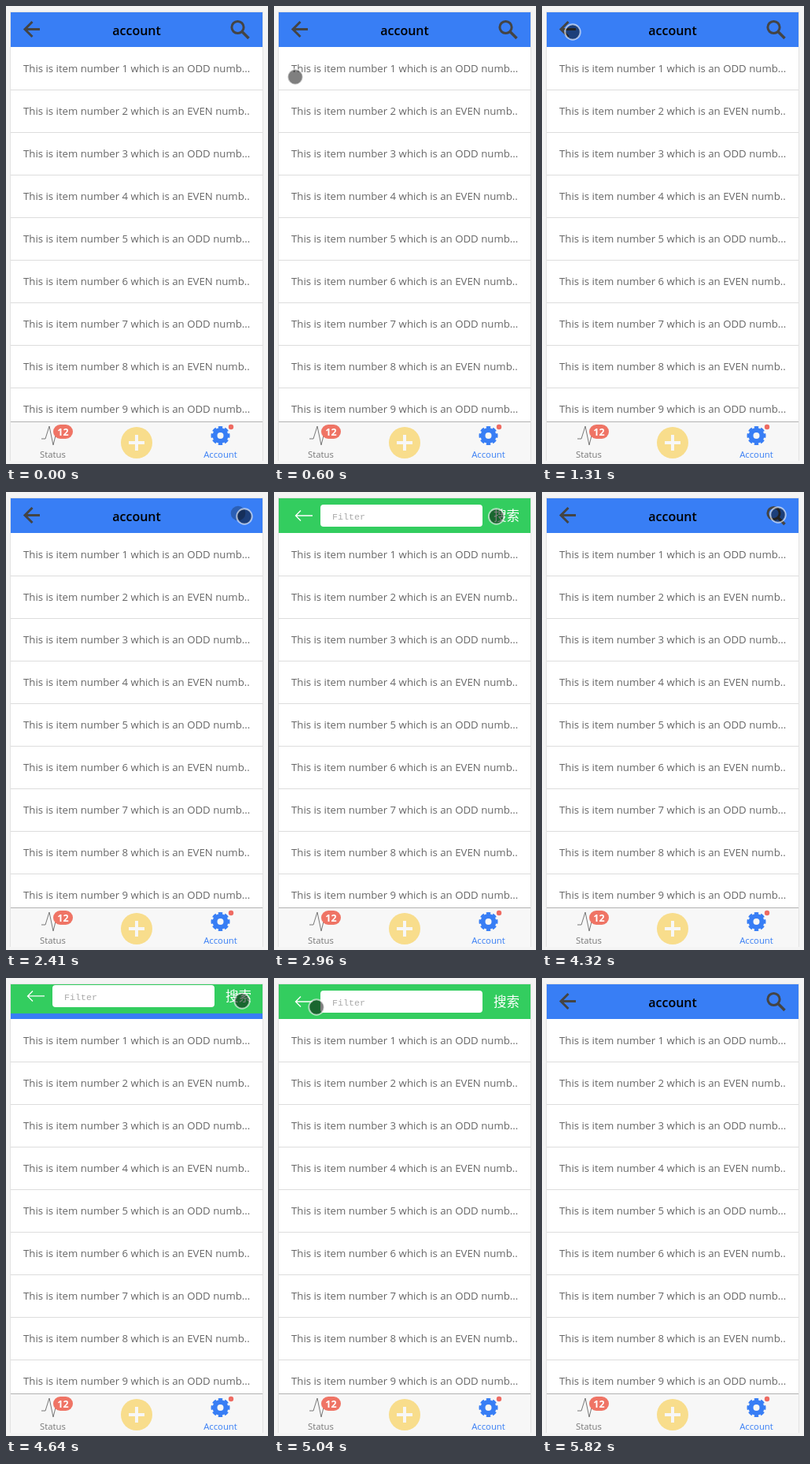
Animation of 333x581 px, one loop 6.36 s. Source, as an HTML page:

```html
<!DOCTYPE html>
<html>
<head>
<meta charset="utf-8">
<style>
html, body { margin: 0; width: 100%; height: 100%; overflow: hidden; background: #f4f4f4; }
svg { display: block; }
text { font-family: "Open Sans", "Noto Sans", sans-serif; }
.row { font-size: 13.22px; fill: #666; }
.line { fill: none; }
.tab { font-size: 11.3px; text-anchor: middle; }
</style>
</head>
<body>
<svg width="333" height="581" viewBox="0 0 333 581">
  <defs><clipPath id="screen"><rect x="6" y="8" width="320" height="569"/></clipPath></defs>
  <rect x="5.5" y="7.5" width="321" height="569" fill="#fff" stroke="#e3e3e3"/>
  <g clip-path="url(#screen)">
    <g id="list"></g>

    <rect x="6" y="8" width="320" height="44" fill="#387ef5"/>
    <g class="line" stroke="#444" stroke-width="3">
      <path d="M43 29.5H25M33.5 20L24 29.5L33.5 39"/>
      <g id="search">
        <circle cx="294.5" cy="27" r="7.6"/>
        <path d="M300 32.5L308.5 41" stroke-width="3.5"/>
      </g>
    </g>
    <circle id="press" cx="295" cy="27" r="9.3" fill="#123" opacity=".33"/>
    <text x="166" y="37" font-size="16" font-weight="600" text-anchor="middle">account</text>

    <g id="filter">
      <rect x="6" y="8" width="320" height="44" fill="#33cd5f"/>
      <path class="line" stroke="#fff" stroke-width="1.3" d="M49 30H28M34 23.5L27.5 30L34 36.5"/>
      <rect x="59" y="16" width="206" height="28" rx="4" fill="#fff"/>
      <text x="74" y="35" font-size="11.7" fill="#aaa" style="font-family:'Liberation Mono',monospace">Filter</text>
      <text x="279" y="36" font-size="16.5" fill="#fff" style="font-family:'Noto Sans CJK SC','Noto Sans CJK',sans-serif;font-weight:300">搜索</text>
    </g>

    <rect x="6" y="527" width="320" height="50" fill="#f7f7f7"/>
    <rect x="6" y="527" width="320" height="1" fill="#b2b2b2"/>
    <path class="line" stroke="#777" d="M45 549H50L55 533L60 557L64 541L67 547H73"/>
    <rect x="60" y="531" width="25" height="18" rx="9" fill="#ef7465"/>
    <text x="72.5" y="545" font-size="12.5" font-weight="700" text-anchor="middle" fill="#fff">12</text>
    <text class="tab" x="59.5" y="573" fill="#777">Status</text>
    <circle cx="166" cy="554" r="20" fill="#f8dd8c"/>
    <path class="line" stroke="#f7f7f7" stroke-width="4" d="M156 554H176M166 544V564"/>
    <g class="line" stroke="#387ef5">
      <circle cx="272.5" cy="545" r="7" stroke-width="6"/>
      <circle cx="272.5" cy="545" r="10" stroke-width="4" pathLength="80" stroke-dasharray="6.4 3.6" stroke-dashoffset="3.2"/>
    </g>
    <circle cx="286" cy="534" r="3.2" fill="#ef6b62"/>
    <text class="tab" x="272.5" y="573" fill="#387ef5">Account</text>
  </g>
  <circle id="cursor" r="9.7" fill="rgba(0,0,0,.5)" stroke="rgba(255,255,255,.6)" stroke-width="2"/>
</svg>
<script>
const LOOP = 6360, STEP = 80, BAR = 44;
const $ = id => document.getElementById(id);
const progress = (t, start, length) => Math.min(1, Math.max(0, (t - start) / length));
const smooth = p => p * p * (3 - 2 * p);
const easeOut = p => 1 - (1 - p) ** 2;

// Pointer trips: start, end, destination
const entry = [62, 247];
const trips = [
  [200, 560, [27, 90]],
  [560, 760, [39, 33]],
  [1300, 1360, [57, 30]],
  [1600, 1760, [320, 31]],
  [2000, 2200, [303, 31]],
  [2880, 3360, [28, 31]],
  [3840, 4240, [300, 29]],
  [4640, 5040, [54, 37]],
  [5190, 5350, [32, 31]],
  [5600, 5760, [60, 570]],
];

function pointer(t) {
  let [x, y] = entry;
  for (const [start, end, to] of trips) {
    const p = smooth(progress(t, start, end - start));
    x += (to[0] - x) * p;
    y += (to[1] - y) * p;
  }
  return `translate(${x} ${y})`;
}

// The filter bar drops in slowly and leaves faster.
const visit = (t, open, close) =>
  easeOut(progress(t, open, 400)) - easeOut(progress(t, close, 240));

function draw(now) {
  const t = Math.floor(now % LOOP / STEP) * STEP;
  const shown = visit(t, 2400, 3600) + visit(t, 4400, 5440);
  $("filter").setAttribute("transform", `translate(0 ${BAR * (shown - 1)})`);
  $("cursor").setAttribute("transform", pointer(t));
  $("cursor").style.display = t > 160 && t < 5760 ? "" : "none";
  const pressed = t >= 2320 && t < 2480;
  $("search").style.display = pressed ? "none" : "";
  $("press").style.display = pressed ? "" : "none";
}

let rows = "";
for (let i = 1; i <= 9; i++) {
  const y = 54 * i - 2;
  const kind = i % 2 ? "ODD numb..." : "EVEN numb..";
  rows += `<text class="row" x="22" y="${y + 32}">This is item number ${i} which is an ${kind}</text>
    <rect x="6" y="${y + 54}" width="320" height="1" fill="#ddd"/>`;
}
$("list").innerHTML = rows;

const begin = performance.now();
(function tick() {
  draw(performance.now() - begin);
  requestAnimationFrame(tick);
})();
</script>
</body>
</html>
```
